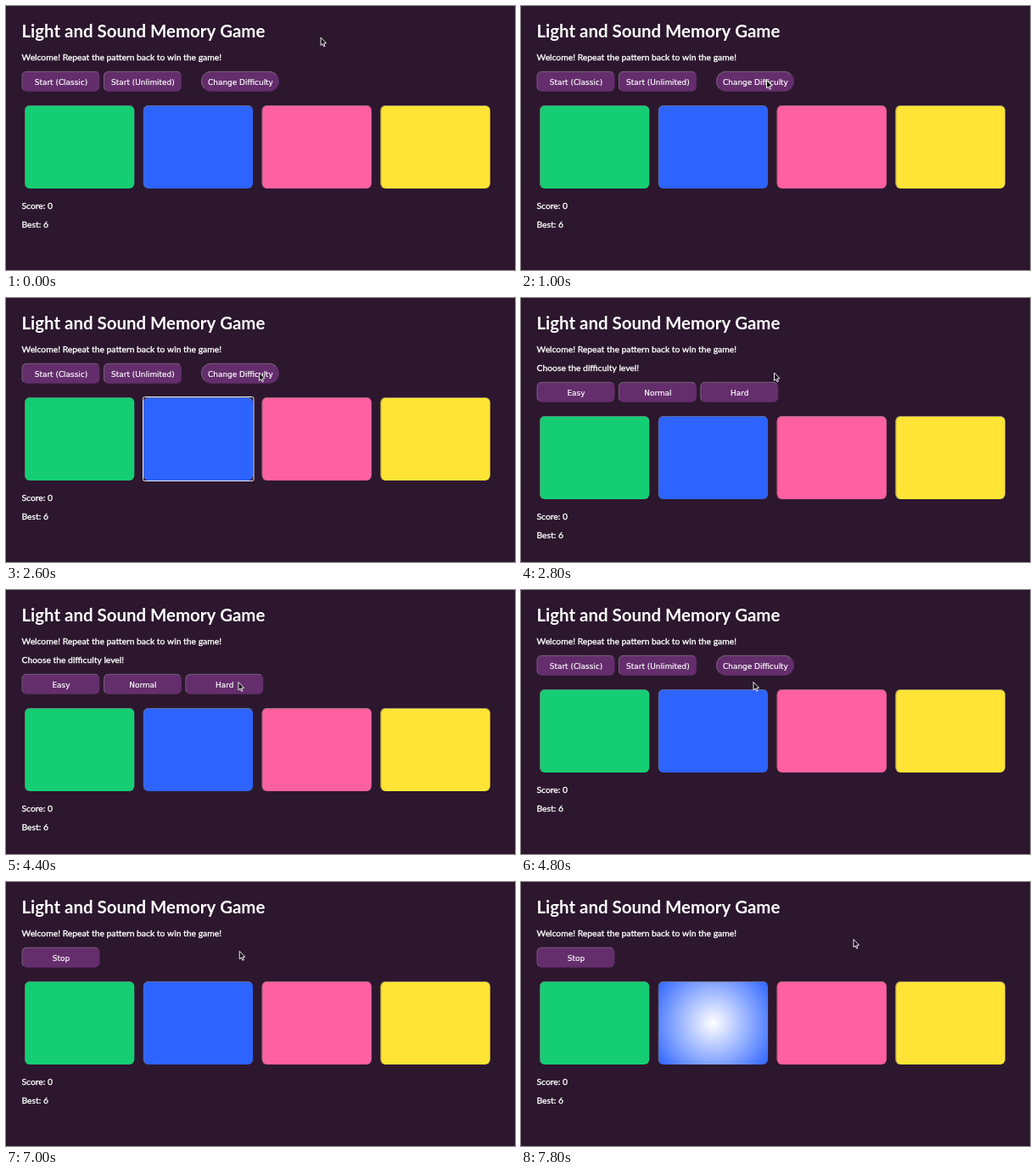
Animation of 600 by 311 pixels, one loop 8 s. Source, as an HTML page with a canvas:

```html
<!DOCTYPE html>
<html lang="en">
<head>
<meta charset="utf-8">
<title>Light and Sound Memory Game</title>
<style>
  html, body { margin: 0; width: 100%; height: 100%; overflow: hidden; background: #2c172e; }
  canvas { display: block; width: 600px; height: 311px; }
</style>
</head>
<body>
<canvas id="stage"></canvas>
<script>
const W = 600, H = 311, LOOP = 8000, STEP = 200;
const BG = '#2c172e', PURPLE = '#642d6c', BLUE = '#2d64ff';
const PANELS = ['#15ce74', BLUE, '#ff609f', '#ffe436'];
const TITLE_FONT = 'bold 20.45px Lato, sans-serif';
const BODY_FONT = '10.35px Lato, sans-serif';
const BUTTON_FONT = '8.93px "DejaVu Sans", Verdana, sans-serif';

// Pointer stops: time, x, y
const PATH = [
  [0, 371, 37], [200, 371, 37], [1000, 289.5, 87.5], [1600, 290, 87.5],
  [2400, 298.5, 88], [3200, 298.5, 88], [4200, 274, 108.5], [4800, 274, 108.5],
  [5800, 158.5, 95.5], [6600, 158.5, 95.5], [7400, 392, 67.5], [8000, 392, 67.5]
];

const canvas = document.getElementById('stage');
const ctx = canvas.getContext('2d');
const dpr = window.devicePixelRatio || 1;
canvas.width = W * dpr;
canvas.height = H * dpr;

// A hairline stroke in the same colour gives the text a slightly heavier weight
function text(str, x, y, font, { align = 'left', weight = 0.35 } = {}) {
  ctx.font = font;
  ctx.textAlign = align;
  ctx.fillStyle = ctx.strokeStyle = '#fff';
  ctx.fillText(str, x, y);
  if (weight) {
    ctx.lineWidth = weight;
    ctx.strokeText(str, x, y);
  }
}

function box(x, y, w, h, r) {
  ctx.beginPath();
  ctx.roundRect(x, y, w, h, r);
}

// Rounded box with a thin grey edge above and to the left
function outsetBox(x, y, w, h, r, fill, edge = 1) {
  const c = h / 2;
  box(x, y, w, h, r);
  ctx.fillStyle = fill;
  ctx.fill();
  ctx.save();
  ctx.beginPath();
  ctx.moveTo(x, y + h);
  ctx.lineTo(x, y);
  ctx.lineTo(x + w, y);
  ctx.lineTo(x + w - c, y + c);
  ctx.lineTo(x + c, y + c);
  ctx.clip();
  box(x + edge / 2, y + edge / 2, w - edge, h - edge, r - edge / 2);
  ctx.lineWidth = edge;
  ctx.strokeStyle = '#716b72';
  ctx.stroke();
  ctx.restore();
}

function button(label, x, y, r = 6) {
  outsetBox(x, y, 92, 24, r, PURPLE);
  text(label, x + 46.5, y + 16.4, BUTTON_FONT, { align: 'center', weight: 0.2 });
}

function glow(x, y, w, h) {
  const cx = x + w / 2, cy = y + h / 2;
  const g = ctx.createRadialGradient(cx, cy, 0, cx, cy, Math.hypot(w, h) / 2);
  g.addColorStop(0, '#fff');
  g.addColorStop(1, BLUE);
  return g;
}

function panels(y, lit, focused) {
  const w = 129.3, h = 98;
  PANELS.forEach((color, i) => {
    const x = 22 + i * 139.8;
    outsetBox(x, y, w, h, 6, lit && i === 1 ? glow(x, y, w, h) : color, 0.8);
  });
  if (focused) {
    box(161.5, y - 0.5, 130.5, 99, 2);
    ctx.lineWidth = 1;
    ctx.strokeStyle = '#e6ecf8';
    ctx.stroke();
  }
}

function pointerAt(t) {
  const i = PATH.findIndex((p, k) => k > 0 && t <= p[0]);
  const [t0, x0, y0] = PATH[i - 1], [t1, x1, y1] = PATH[i];
  const u = (t - t0) / (t1 - t0);
  const e = u * u * (3 - 2 * u);
  return [x0 + (x1 - x0) * e, y0 + (y1 - y0) * e];
}

function pointer(x, y) {
  const shape = [[0, 0], [0, 9.4], [2.1, 7.5], [3.6, 10.8], [5, 10.2], [3.6, 7], [6.5, 6.7]];
  ctx.beginPath();
  shape.forEach(([dx, dy]) => ctx.lineTo(x + dx, y + dy));
  ctx.closePath();
  ctx.lineJoin = 'round';
  ctx.lineWidth = 1;
  ctx.fillStyle = '#120b13';
  ctx.fill();
  ctx.strokeStyle = '#f0edf0';
  ctx.stroke();
}

function draw(t) {
  const choosing = t >= 2800 && t < 4800;
  const playing = t >= 6600;
  const shift = choosing ? 22 : 0;
  const rowY = 76.7 + shift;

  ctx.setTransform(dpr, 0, 0, dpr, 0, 0);
  ctx.fillStyle = BG;
  ctx.fillRect(0, 0, W, H);

  text('Light and Sound Memory Game', 18.5, 37.2, TITLE_FONT, { weight: 0 });
  text('Welcome! Repeat the pattern back to win the game!', 18.5, 64.2, BODY_FONT);

  if (choosing) {
    text('Choose the difficulty level!', 18.5, 86, BODY_FONT);
    ['Easy', 'Normal', 'Hard'].forEach((s, i) => button(s, 18.5 + i * 96.4, rowY));
  } else if (playing) {
    button('Stop', 18.5, rowY);
  } else {
    button('Start (Classic)', 18.5, rowY);
    button('Start (Unlimited)', 114.9, rowY);
    button('Change Difficulty', 230, rowY, 12);
  }

  panels(117 + shift, t >= 7600, t >= 2400 && t < 2800);
  text('Score: 0', 18.5, 239 + shift, BODY_FONT);
  text('Best: 6', 18.5, 261 + shift, BODY_FONT);
  pointer(...pointerAt(t));
}

function tick() {
  const t = performance.now() % LOOP;
  draw(Math.floor(t / STEP) * STEP);
  requestAnimationFrame(tick);
}
tick();
</script>
</body>
</html>
```
